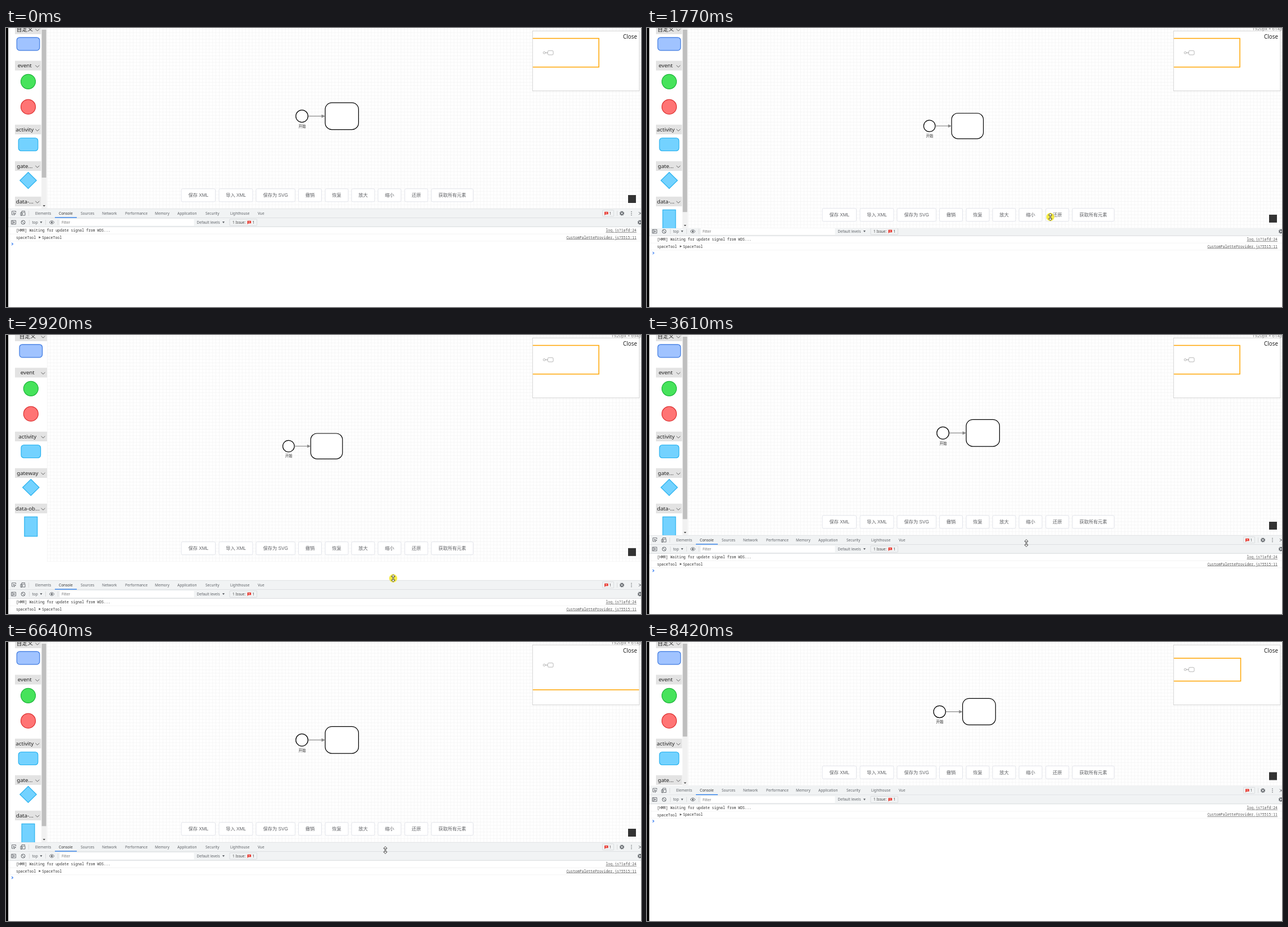
Write an HTML page that moves like this. It is 1130 by 496 pixels and loops after 8.89 s.

```html
<!DOCTYPE html>
<html lang="zh">
<head>
<meta charset="utf-8">
<title>Diagram editor resize</title>
<style>
html, body { margin: 0; width: 100%; height: 100%; overflow: hidden; background: #fff; }
svg { display: block; width: 100vw; height: 100vh; }
text { white-space: pre; }
.ui { font-family: "Noto Sans", "Noto Sans CJK SC", sans-serif; }
.cjk { font-family: "Liberation Sans", "Noto Sans CJK SC", sans-serif; }
.mono { font-family: "Noto Sans Mono", monospace; }
</style>
</head>
<body>
<script>
const LOOP = 8890, STEP = 77.4, PHASE = 1138;
const FULL = 560, PX = 0.5885;

function el(tag, attrs, parent) {
  const n = document.createElementNS('http://www.w3.org/2000/svg', tag);
  set(n, attrs);
  if (parent) parent.appendChild(n);
  return n;
}
function set(n, attrs) {
  for (const k in attrs) n.setAttribute(k, attrs[k]);
}
const show = (n, on) => set(n, { visibility: on ? 'inherit' : 'hidden' });
const move = (n, x, y) => set(n, { transform: `translate(${x} ${y})` });
const group = (parent, attrs) => el('g', attrs, parent);
const rect = (p, x, y, width, height, fill, more) =>
  el('rect', { x, y, width, height, fill, ...more }, p);
const circle = (p, cx, cy, r, fill, more) => el('circle', { cx, cy, r, fill, ...more }, p);
const path = (p, d, stroke, width = 1, fill = 'none') =>
  el('path', { d, stroke, 'stroke-width': width, fill }, p);
// y is the middle of the line
function text(p, str, x, y, size, cls = 'ui', fill = '#333', anchor = 'start') {
  const n = el('text', { x, y: y + size * 0.36, 'font-size': size, class: cls, fill, 'text-anchor': anchor }, p);
  n.textContent = str;
  return n;
}

// piecewise linear value of [time, value] pairs
function track(keys, t) {
  if (t <= keys[0][0]) return keys[0][1];
  for (let i = 1; i < keys.length; i++) {
    const [t0, a] = keys[i - 1], [t1, b] = keys[i];
    if (t < t1) return a + (b - a) * (t - t0) / (t1 - t0);
  }
  return keys[keys.length - 1][1];
}
// last value whose time has come
const hold = (keys, t) => keys.reduce((v, [at, x]) => t >= at ? x : v, keys[0][1]);
const within = (t, ...spans) => spans.some(([a, b]) => t >= a && t < b);

const SPLIT = [
  [1140, 321], [1380, 432], [1602, 356], [1680, 337], [1757, 322], [1850, 300],
  [2060, 400], [2144, 370], [2221, 348], [2299, 333], [2500, 290], [2850, 440],
  [3200, 330], [3380, 356], [6900, 356], [7020, 358.5], [7098, 362], [7175, 362], [7330, 255.5]
];
const ZOOM = [
  [1140, 1], [1400, .965], [1770, .951], [2300, .944], [2900, .95], [3380, 1],
  [7250, 1], [7400, .988]
];
const MOUSE_X = [
  [130, 956], [280, 752], [1140, 752], [1770, 717], [2300, 707], [3400, 675],
  [7000, 675], [7175, 679], [7335, 712], [7650, 712], [8100, 860], [8400, 985]
];
const MOUSE_Y_IN = [[130, 440], [280, 346], [450, 345], [680, 335]];
const MOUSE_Y_OUT = [[7650, 270], [8100, 400], [8400, 500]];
// overview: top, bottom and right of the viewport box, middle of the diagram
const MAP = [
  [0, [18.5, 69.5, 1055, 44]], [4150, [-9, 85, 1055, 26]], [4530, [-9, 85, 1150, 41]],
  [5550, [-9, 85, 1055, 26]], [5870, [-9, 85, 1150, 41]], [7650, [28.8, 69.5, 1056.5, 49]]
];
const OPENED = [[0, -1000], [4530, 4530], [5870, 5870]];

const svg = el('svg', { viewBox: '0 0 1130 496' }, document.body);
const defs = el('defs', {}, svg);
const clip = (id, x, y, w, h) => rect(el('clipPath', { id }, defs), x, y, w, h, '#000');
const pageClip = clip('page', 4, 0, 1126, 321);
clip('map', 937.5, 5.5, 189, 106);
const grid = el('pattern', { id: 'grid', width: 40 * PX, height: 40 * PX, patternUnits: 'userSpaceOnUse', x: 73, y: 2 }, defs);
for (let i = 0; i < 4; i++) {
  const p = i * 10 * PX + .3;
  path(grid, `M${p} 0V24M0 ${p}H24`, i ? '#f4f4f4' : '#efefef', .7);
}
rect(svg, 0, 0, 1130, 496, '#fff');

// developer tools, drawn with their top edge at 0
const tools = group(svg);
rect(tools, 4, 0, 1126, 500, '#fff');
path(tools, 'M4 .3H1130', '#cacdd1', .8);

const tabs = group(tools);
rect(tabs, 4, .6, 1126, 15.8, '#f1f3f4');
path(tabs, 'M4 16.5H1130', '#cacdd1', .7);
path(tabs, 'M13 11H10.5V4.7H17.5V7M13 7L17.5 9.2L15.4 9.9L14.6 12Z', '#5f6368', .9);
path(tabs, 'M28 12V4.5H33.5V6M26 7H29V12.3H26ZM30 12H34V7H30', '#5f6368', .9);
path(tabs, 'M40.5 4V13', '#ccc', .6);
[['Elements', 52], ['Console', 94], ['Sources', 133], ['Network', 171], ['Performance', 212],
 ['Memory', 265], ['Application', 305], ['Security', 355], ['Lighthouse', 399], ['Vue', 448]]
  .forEach(([s, x]) => text(tabs, s, x, 8.5, 6.55, 'ui', s === 'Console' ? '#333' : '#5f6368'));
rect(tabs, 87, 15.3, 39, 1.4, '#1a73e8');

function badge(p, x, y) {
  path(p, `M${x} ${y - 2.6}h6.6v4.6h-4.4l-2.2 1.6z`, 'none', 0, '#e8382f');
  path(p, `M${x + 2.2} ${y - 1.4}l2 2m0 -2l-2 2`, '#fff', .7);
}
function gear(p, x, y) {
  circle(p, x, y, 3.3, 'none', { stroke: '#5f6368', 'stroke-width': 1.5, 'stroke-dasharray': '1.6 .99' });
  circle(p, x, y, 2.1, 'none', { stroke: '#5f6368', 'stroke-width': 1.4 });
}
rect(tabs, 1061.5, 2.8, 20, 11, '#f1f3f4', { stroke: '#d0d3d6', 'stroke-width': .7, rx: 1 });
badge(tabs, 1065, 8.3);
text(tabs, '1', 1073.5, 8.5, 6.5, 'ui', '#555');
path(tabs, 'M1087.5 4V13', '#ccc', .6);
gear(tabs, 1096, 8.5);
[5.5, 8.5, 11.5].forEach(y => circle(tabs, 1113, y, .8, '#5f6368'));
path(tabs, 'M1126 6l5 5m0 -5l-5 5', '#5f6368', 1);

const bar = group(tools);
rect(bar, 4, 16.8, 1126, 15.4, '#f1f3f4');
path(bar, 'M4 32.3H1130', '#cacdd1', .7);
path(bar, 'M9.5 21.2H17.5V27.8H9.5ZM11.6 21V28', '#5f6368', .9);
path(bar, 'M13.2 22.6L16 24.5L13.2 26.4Z', 'none', 0, '#5f6368');
circle(bar, 30.5, 24.5, 3.4, 'none', { stroke: '#5f6368', 'stroke-width': 1 });
path(bar, 'M28.2 22.1L32.8 26.9', '#5f6368', 1);
[22, 41, 70, 92].forEach(x => x > 22 && path(bar, `M${x}.5 20V29`, '#ccc', .6));
const arrow = (p, x, y) => path(p, `M${x} ${y - 1.6}h4l-2 3.4z`, 'none', 0, '#5f6368');
text(bar, 'top', 46.5, 24.5, 6.55, 'ui', '#5f6368');
arrow(bar, 60.5, 24.5);
path(bar, 'M77 24.5Q81.5 18.8 86 24.5Q81.5 30.2 77 24.5Z', '#5f6368', .9);
circle(bar, 81.5, 24.5, 1.6, '#5f6368');
rect(bar, 96, 18.8, 238.5, 11.6, '#fff');
text(bar, 'Filter', 99, 24.8, 6.4, 'ui', '#757575');
text(bar, 'Default levels', 339.5, 24.5, 6.5, 'ui', '#5f6368');
arrow(bar, 385, 24.5);
rect(bar, 398, 18.8, 48.5, 11.4, '#f1f3f4', { stroke: '#d0d3d6', 'stroke-width': .7, rx: 1 });
text(bar, '1 Issue:', 403, 24.5, 6.5, 'ui', '#444');
badge(bar, 429.5, 24.3);
text(bar, '1', 438.5, 24.5, 6.5, 'ui', '#444');
gear(bar, 1128, 24.5);

const logs = group(tools);
path(logs, 'M4 45.3H1130M4 57.8H1130', '#efefef', .7);
const link = (s, y) => {
  const n = text(logs, s, 1122, y, 6.5, 'mono', '#545454', 'end');
  set(n, { 'text-decoration': 'underline' });
  return n;
};
text(logs, '[HMR] Waiting for update signal from WDS...', 18, 39, 6.5, 'mono');
link('log.js?1afd:24', 39);
text(logs, 'spaceTool', 18, 51.7, 6.5, 'mono');
path(logs, 'M58.5 49.2L62 51.2L58.5 53.2Z', 'none', 0, '#555');
text(logs, 'SpaceTool', 64, 51.2, 6.5, 'mono');
const sourceLink = link('CustomPaletteProvider.js?5515:11', 51.2);
path(logs, 'M10 61L12.4 63L10 65', '#367cf1', 1.1);

// page
const page = group(svg, { 'clip-path': 'url(#page)' });
rect(page, 4, 0, 1126, 600, '#fff');
rect(page, 73, 0, 1057, 600, 'url(#grid)');

const diagram = group(page);
const ink = { stroke: '#000', 'stroke-width': 1.25 };
circle(diagram, 526.6, 0, 10.8, '#fff', ink);
rect(diagram, 568, -23.8, 59.4, 47.6, '#fff', { ...ink, rx: 11.8 });
path(diagram, 'M538 0H563', '#888', 1.2);
path(diagram, 'M561.5 -3L568 0L561.5 3Z', 'none', 0, '#888');
text(diagram, '开始', 527, 18.4, 6.6, 'cjk', '#222', 'middle');

// palette
rect(page, 4, 0, 69, 600, '#fff');
const heads = [[2.5, '自定义'], [67, 'event'], [180.5, 'activity'], [245.5, 'gate...', 'gateway'], [308.5, 'data-...', 'data-ob...']]
  .map(([y, short, long = short]) => ({
    short, long,
    box: rect(page, 16, y - 8.7, 46, 17.2, '#e3e3e3'),
    label: text(page, short, 33, y, 9.7, 'ui', '#222', 'middle'),
    mark: path(group(page), `M-3.5 ${y - .6}L0 ${y + 2.6}L3.5 ${y - .6}`, '#444', .8)
  }));
const shapes = group(page);
const tint = stroke => ({ stroke, 'stroke-width': 1.2 });
rect(shapes, -20.3, 16.8, 40.6, 23, '#a0c3ff', { ...tint('#3b78e0'), rx: 5 });
circle(shapes, 0, 95.3, 13, '#46e35b', tint('#1db53a'));
circle(shapes, 0, 140.2, 13, '#ff7474', tint('#dc2f2f'));
rect(shapes, -17.3, 195.5, 34.6, 23, '#73d2ff', { ...tint('#25b0ee'), rx: 5 });
path(shapes, 'M0 256.5L14.7 271L0 285.5L-14.7 271Z', '#25b0ee', 1.2, '#73d2ff');
rect(shapes, -11.4, 323.3, 22.8, 34.6, '#73d2ff', tint('#25b0ee'));

const scroll = group(page);
rect(scroll, 63, 0, 9.5, 600, '#f1f1f1');
const thumb = rect(scroll, 63.6, 3, 8, 263, '#bfbfbf');
const down = path(scroll, 'M65.5 -1H70L67.8 1.4Z', 'none', 0, '#444');

// bottom controls, drawn relative to the lower page edge
const foot = group(page);
[['保存 XML', 312, 60.5], ['导入 XML', 379, 60], ['保存为 SVG', 445, 69.5], ['撤销', 520.5, 41], ['恢复', 568, 41],
 ['放大', 615, 41], ['缩小', 662, 41], ['还原', 709.7, 41], ['获取所有元素', 757, 74.3]]
  .forEach(([s, x, w]) => {
    rect(foot, x, -35.2, w, 23, '#fff', { stroke: '#dcdfe6', 'stroke-width': .8, rx: 2.3 });
    text(foot, s, x + w / 2, -23.8, 8.24, 'cjk', '#606266', 'middle');
  });
rect(foot, 1107, -24, 14, 14, '#333');

// overview
rect(page, 937, 5.2, 190, 106.6, '#fff', { stroke: '#ccc', 'stroke-width': .9 });
const inner = group(page, { 'clip-path': 'url(#map)' });
const mini = group(inner);
circle(mini, 957.8, 0, 1.9, '#fff', { stroke: '#888', 'stroke-width': .6 });
path(mini, 'M960 0H964', '#888', .8);
rect(mini, 964, -3.8, 9.8, 7.6, '#fff', { stroke: '#888', 'stroke-width': .6, rx: 2 });
const frame = rect(inner, 930, 18, 125, 52, 'none', { stroke: '#ffa500', 'stroke-width': 1.5 });
text(page, 'Close', 1123, 15.5, 9.85, 'ui', '#222', 'end');

const size = group(page);
rect(size, 1074, -10, 60, 14.6, '#fff', { opacity: .8 });
const sizeText = text(size, '', 1077, .8, 7.9, 'ui', '#777');

rect(svg, 0, 0, 4, 496, '#000');

// pointers
const mouse = group(svg);
const glow = circle(mouse, 0, 0, 7.2, '#f5ea32', { opacity: .9 });
const pointer = path(mouse, 'M0 -1V9.2L2.2 7.2L3.8 10.6L5.3 9.9L3.8 6.6H6.6Z', '#222', .8, '#fff');
const resizer = path(mouse, 'M0 -6.5L3.2 -3H.9V3H3.2L0 6.5L-3.2 3H-.9V-3H-3.2Z', '#222', .8, '#fff');

function draw(t) {
  const q = Math.floor((t - PHASE) / STEP) * STEP + PHASE;
  const closed = within(t, [3840, 4530], [5250, 5870]);
  // the panel follows the pointer one step late, the page two
  const panel = track(SPLIT, q - STEP);
  const height = closed ? FULL : track(SPLIT, q - 2 * STEP);
  const wide = height >= 386;

  show(tools, !closed);
  move(tools, 0, panel);
  const age = t - hold(OPENED, t);
  show(tabs, age >= 80);
  show(bar, age >= 160);
  show(logs, age >= 320);
  show(sourceLink, age >= 320 && !within(t, [4530, 5080]));

  set(pageClip, { height });
  move(foot, 0, height);
  show(scroll, !wide);
  set(thumb, { height: Math.max(0, height * height / 386 - 4) });
  move(down, 0, height - 5);
  for (const h of heads) {
    set(h.box, { width: wide ? 57 : 46.5 });
    set(h.label, { x: wide ? 38.3 : 33.3 });
    h.label.textContent = wide ? h.long : h.short;
    move(h.mark, wide ? 66 : 55.8, 0);
  }
  move(shapes, wide ? 44.3 : 39.5, 0);

  const zoom = track(ZOOM, q);
  let middle = closed ? 174.3 : height / 2 - 3.8;
  if (within(t, [6800, 7250])) middle -= 3.8;
  set(diagram, { transform: `translate(${33 * (1 - zoom)} ${middle}) scale(${zoom})` });

  const [top, bottom, right, mid] = hold(MAP, t);
  set(frame, { y: top, height: bottom - top, width: right - 930 });
  move(mini, 0, mid);
  show(size, within(t, [1217, 3840], [4530, 5250], [5870, 8400]));
  sizeText.textContent = `1920px × ${Math.round(614 + (height - 356) / PX)}px`;

  const y = t < 680 ? track(MOUSE_Y_IN, q) : t < 7650 ? track(SPLIT, q) + 14 : track(MOUSE_Y_OUT, q);
  const plain = closed || t < 530 || t >= 7650 || within(t, [5870, 6200]);
  show(mouse, within(t, [130, 8400]));
  move(mouse, track(MOUSE_X, q), y);
  show(pointer, plain);
  show(resizer, !plain);
  show(glow, within(t, [1140, 3450], [6950, 7560]));
}

const start = performance.now();
function tick() {
  draw((performance.now() - start) % LOOP);
  requestAnimationFrame(tick);
}
tick();
</script>
</body>
</html>
```
